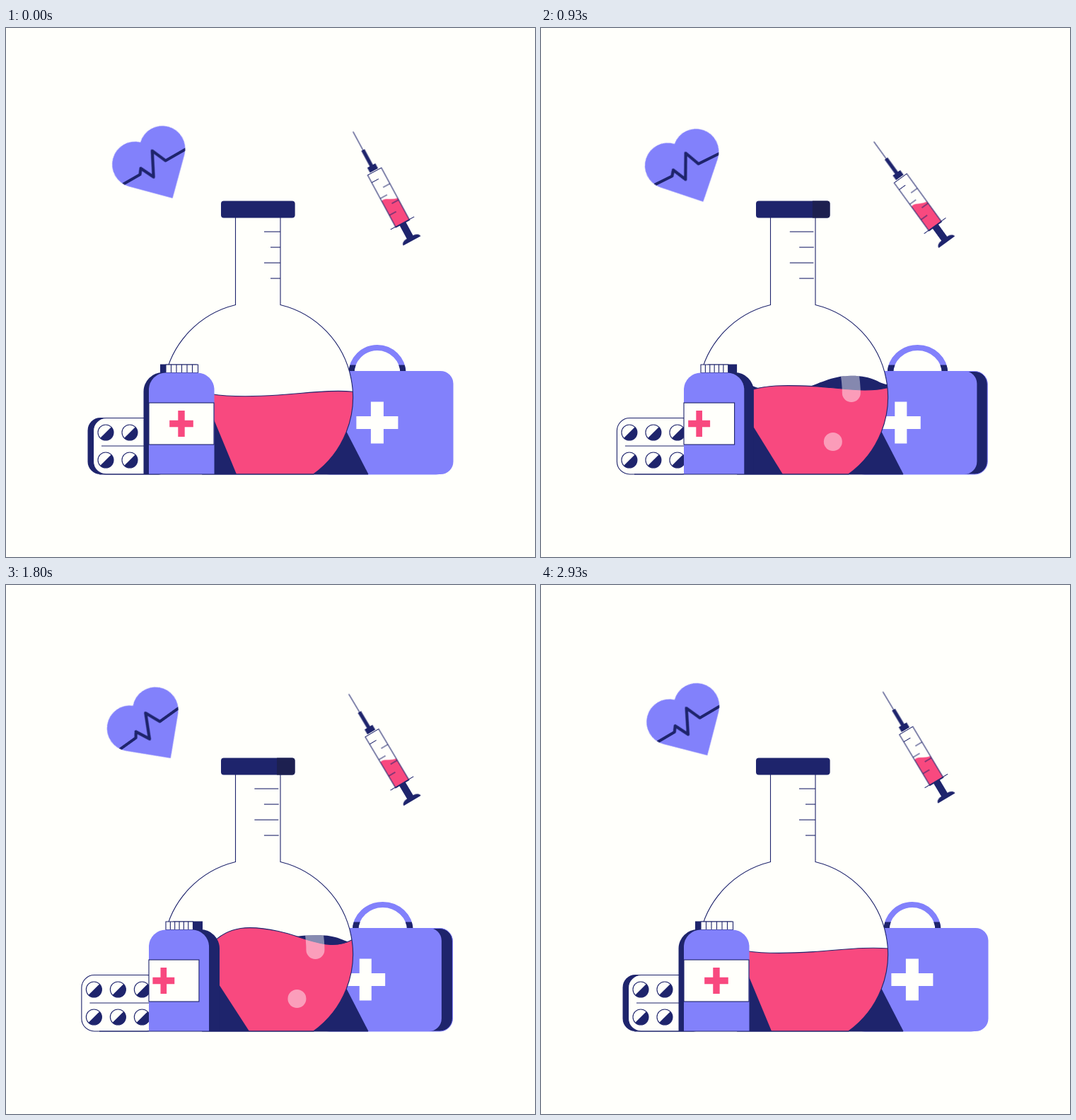
These frames come from a looping animation (748 px wide and 748 px high, 2.99 s). An HTML page:

```html
<!DOCTYPE html>
<html lang="en">
<head>
<meta charset="utf-8">
<title>Medical kit</title>
<style>
@property --turn { syntax: "<number>"; inherits: true; initial-value: 0; }
@property --lean { syntax: "<number>"; inherits: true; initial-value: 0; }

html, body { margin: 0; width: 100%; height: 100%; overflow: hidden; background: #fffffb; }

svg {
  --paper: #fffffb; --navy: #1e246c; --violet: #8281fb; --pink: #f8497f;
  --sine: cubic-bezier(.37, 0, .63, 1);
  display: block; width: 100vw; height: 100vh;
  animation: turn 2990ms cubic-bezier(.65, 0, .35, 1) infinite, lean 2990ms var(--sine) infinite;
}
@keyframes turn { 0%, 100% { --turn: 0; } 45% { --turn: 1; } }
@keyframes lean { 0%, 100% { --lean: 0; } 40%, 60% { --lean: 1; } }

.paper { fill: var(--paper); }
.navy { fill: var(--navy); }
.violet { fill: var(--violet); }
.pink { fill: var(--pink); }
.line { stroke: var(--navy); stroke-width: 1.1; }
.bare { fill: none; }

/* kit case */
.case-side { x: 440px; width: calc(186px + 6px * var(--turn)); stroke: var(--violet); }
.case-front { x: 440px; width: calc(192.5px - 18.3px * var(--turn)); }
.handle { transform: translate(calc(525px + 8.5px * var(--turn)), 488.5px) scaleX(calc(1 + .065 * var(--turn))); }
.handle circle { fill: none; stroke-width: 8; }
.case-cross { transform: translate(calc(524.9px - 18.3px * var(--turn)), 558px) scaleX(calc(1 - .06 * var(--turn))); }

/* flask */
.cap-shade { x: calc(408.5px - 28px * var(--turn)); width: 30px; fill: #1d2050; }
.mark { height: 1.1px; }
.long { x: calc(365px - 15px * var(--turn)); width: calc(23px + 12px * var(--turn)); }
.short { x: calc(374px - 10px * var(--turn)); width: calc(14px + 7.5px * var(--turn)); }
.bubbles { opacity: calc(.52 * var(--turn)); transform: translateX(calc(-48.5px * var(--turn))); }
.front { animation: front 2990ms linear infinite; }
.back { animation: back 2990ms linear infinite; }
@keyframes front {
  0%, 100% { d: path("M290 517.5 C315 521.6 345 521.6 385 519 S460 511 494 514.5 V640 H220 V517Z"); }
  22.4% { d: path("M290 517 C315 516.5 345 516.5 385 515 S460 513.5 494 513 V640 H220 V517Z"); }
  40.1% { d: path("M290 511 C315 492.5 345 492.5 385 498 S460 520.5 494 502 V640 H220 V511Z"); }
  60.2% { d: path("M290 508 C315 481 345 481 385 489.5 S460 521.5 494 499 V640 H220 V508Z"); }
  71.2% { d: path("M290 516 C315 497 345 497 385 502 S460 513.5 494 505 V640 H220 V516Z"); }
  87% { d: path("M290 517.5 C315 519 345 519 385 516.5 S460 511 494 513 V640 H220 V517Z"); }
}
@keyframes back {
  0%, 87%, 100% { d: path("M262 522 C285 522 300 522 340 522 S400 520 438 520 S475 520 495 520 V640 H220Z"); }
  22.4% { d: path("M262 510 C285 510 300 516 340 516 S400 502 438 502 S475 508.5 495 508.5 V640 H220Z"); }
  40.1% { d: path("M262 477 C285 477 300 513 340 513 S400 481 438 481 S475 500 495 500 V640 H220Z"); }
  60.2% { d: path("M262 503 C285 503 300 507 340 507 S400 495 438 495 S475 506 495 506 V640 H220Z"); }
  71.2% { d: path("M262 512 C285 512 300 512 340 512 S400 506 438 506 S475 509 495 509 V640 H220Z"); }
}
.shadow { animation: shadow 2990ms var(--sine) infinite; }
@keyframes shadow {
  0%, 100% { d: path("M285 532 L326 631 H250 V532Z"); }
  40%, 60% { d: path("M285 540 L344 631 H250 V540Z"); }
}

/* pill pack */
.pack-side { x: calc(115.5px + 4px * var(--turn)); width: 110px; }
.pack { transform: translateX(calc(-18.3px * var(--turn))); }

/* bottle */
.bottle-side {
  x: calc(194.5px + 20px * var(--turn));
  width: calc(98px + 9.5px * var(--lean) - 20px * var(--turn));
}
.bottle-front { x: 202px; width: calc(92.5px - 8.2px * var(--turn)); }
.lid-side {
  x: calc(218px + 20px * var(--turn));
  width: calc(52px + 8px * var(--lean) - 20px * var(--turn));
}
.lid { transform: translate(226px, 476px) scaleX(calc(1 - .17 * var(--turn))); }
.lid path { vector-effect: non-scaling-stroke; }
.label { x: 202px; width: calc(92px - 23.2px * var(--turn)); }
.label-cross { transform: translate(calc(248px - 27.7px * var(--turn)), 559.5px) scaleX(calc(1 - .09 * var(--turn))); }

/* floating pieces */
.heart { animation: heart-drift 2990ms linear infinite; }
.heart-tilt { animation: heart-tilt 2990ms var(--sine) -2317ms infinite; }
@keyframes heart-drift {
  0%, 100% { transform: translate(209.7px, 195.6px); }
  22.4% { transform: translate(205.9px, 198.1px); }
  40.1% { transform: translate(206.6px, 200.1px); }
  60.2% { transform: translate(202.5px, 202.6px); }
  71.2% { transform: translate(199.4px, 202.3px); }
  87% { transform: translate(203.9px, 198.9px); }
}
@keyframes heart-tilt {
  0%, 100% { transform: rotate(-25.5deg); }
  47.5% { transform: rotate(-36.8deg); }
}
.syringe { animation: syringe-drift 2990ms linear infinite; }
.syringe-swing { animation: syringe-swing 2990ms var(--sine) -2630ms infinite; }
@keyframes syringe-drift {
  0%, 22.4%, 100% { transform: translate(574px, 301px); }
  40.1% { transform: translate(573.5px, 304.5px); }
  60.2% { transform: translate(574.5px, 305px); }
  71.2% { transform: translate(573px, 304px); }
  87% { transform: translate(570.5px, 304.5px); }
}
@keyframes syringe-swing {
  0%, 100% { transform: rotate(-19.5deg); }
  18.5% { transform: rotate(-36deg); }
  38.1% { transform: rotate(-28deg); }
  72.2% { transform: rotate(-42deg); }
}
</style>
</head>
<body>
<svg viewBox="0 0 748 748">
  <defs>
    <path id="flask" d="M324.5 268V391.5A134.3 134.3 0 0 0 277.8 631H434.7A134.3 134.3 0 0 0 388 391.5V268"/>
    <path id="heart" d="M0 0L-45.6-45.6A32.25 32.25 0 0 1 0-91.2A32.25 32.25 0 0 1 45.6-45.6Z"/>
    <rect id="cap" x="304" y="244.5" width="104.5" height="24" rx="4"/>
    <g id="pill">
      <circle r="11" class="paper line"/>
      <path class="navy" d="M7.8-7.8A11 11 0 0 1-7.8 7.8Z"/>
    </g>
    <clipPath id="in-flask"><use href="#flask"/></clipPath>
    <clipPath id="in-heart"><use href="#heart"/></clipPath>
    <clipPath id="in-cap"><use href="#cap"/></clipPath>
    <clipPath id="in-liquid"><path class="back"/><path class="front"/></clipPath>
    <clipPath id="above-floor"><rect x="180" y="460" width="140" height="171"/></clipPath>
    <clipPath id="handle-feet"><rect x="-50" y="-12" width="100" height="12"/></clipPath>
  </defs>

  <rect class="paper" width="748" height="748"/>

  <g class="handle">
    <circle r="36.5" stroke="var(--violet)"/>
    <g clip-path="url(#handle-feet)"><circle r="36.5" stroke="var(--navy)"/></g>
  </g>
  <rect class="case-side navy" y="485.5" height="145.5" rx="18"/>
  <rect class="case-front violet" y="485" height="146" rx="18"/>
  <path class="case-cross paper" d="M-9-29.5H9V-9H29.5V9H9V29.5H-9V9H-29.5V-9H-9Z"/>
  <path class="navy" d="M479 566L512.5 631H430Z"/>

  <use href="#flask" class="paper"/>
  <g clip-path="url(#in-flask)">
    <path class="back navy"/>
    <path class="front pink line"/>
    <g clip-path="url(#in-liquid)">
      <g class="bubbles" fill="#fff">
        <circle cx="455.5" cy="585" r="13"/>
        <path transform="translate(481.5 516)" d="M-13 0A13 13 0 0 0 13 0C13-14 11-27 8-40H-18C-15-27-13-14-13 0Z"/>
      </g>
    </g>
  </g>
  <use href="#flask" class="bare line"/>
  <g class="navy">
    <rect class="mark long" y="287.5"/>
    <rect class="mark short" y="309.5"/>
    <rect class="mark long" y="331.5"/>
    <rect class="mark short" y="353.5"/>
  </g>
  <use href="#cap" class="navy"/>
  <g clip-path="url(#in-cap)"><rect class="cap-shade" y="244" height="25"/></g>
  <path class="shadow navy"/>

  <rect class="pack-side navy" y="551" height="80" rx="18"/>
  <g class="pack">
    <rect class="paper line" x="123.5" y="551.5" width="110" height="79.5" rx="18"/>
    <path class="line" d="M135 591H230"/>
    <use href="#pill" x="141" y="572"/>
    <use href="#pill" x="175" y="572"/>
    <use href="#pill" x="209" y="572"/>
    <use href="#pill" x="141" y="611"/>
    <use href="#pill" x="175" y="611"/>
    <use href="#pill" x="209" y="611"/>
  </g>

  <g clip-path="url(#above-floor)">
    <rect class="lid-side navy" y="475.5" height="12.5"/>
    <g class="lid"><path class="paper line" d="M0 0H45.5V11.5H0ZM7.5 0V11.5M15 0V11.5M22.5 0V11.5M30 0V11.5M37.5 0V11.5"/></g>
    <rect class="bottle-side navy" y="487" height="200" rx="27"/>
    <rect class="bottle-front violet" y="487.5" height="200" rx="24"/>
    <rect class="label paper line" y="530" height="59"/>
    <path class="label-cross pink" d="M-4.7-18.5H4.7V-4.7H16.8V4.7H4.7V18.5H-4.7V4.7H-16.8V-4.7H-4.7Z"/>
  </g>
  <path class="line" d="M132 631H512"/>

  <g class="heart"><g class="heart-tilt"><g transform="translate(0 52)">
    <use href="#heart" class="violet"/>
    <g clip-path="url(#in-heart)">
      <path class="bare" stroke="var(--navy)" stroke-width="4.2" stroke-linejoin="round"
        d="M-54-52H-23.3L-18-59L-8.4-39.5L8.4-72.5L17.8-51H54"/>
    </g>
  </g></g></g>

  <g class="syringe"><g class="syringe-swing">
    <path class="line" d="M0-175.5V-145"/>
    <path class="navy" d="M-2.6-146H2.6V-121H6.5V-113H-6.5V-121H-2.6ZM-5-28H5V-6C8-6 14-5 14 0H-14C-14-5-8-6-5-6Z"/>
    <rect class="paper" x="-11" y="-111.5" width="22" height="84"/>
    <path class="pink" d="M-11-70C-5-73 2-64 11-63V-27.5H-11Z"/>
    <path class="bare line" d="M-11-111.5H11V-27.5H-11ZM-19-28.5H19M-11-99.5H0M-11-74H0M-11-47H0M0-86H11M0-60H11"/>
  </g></g>
</svg>
</body>
</html>
```
